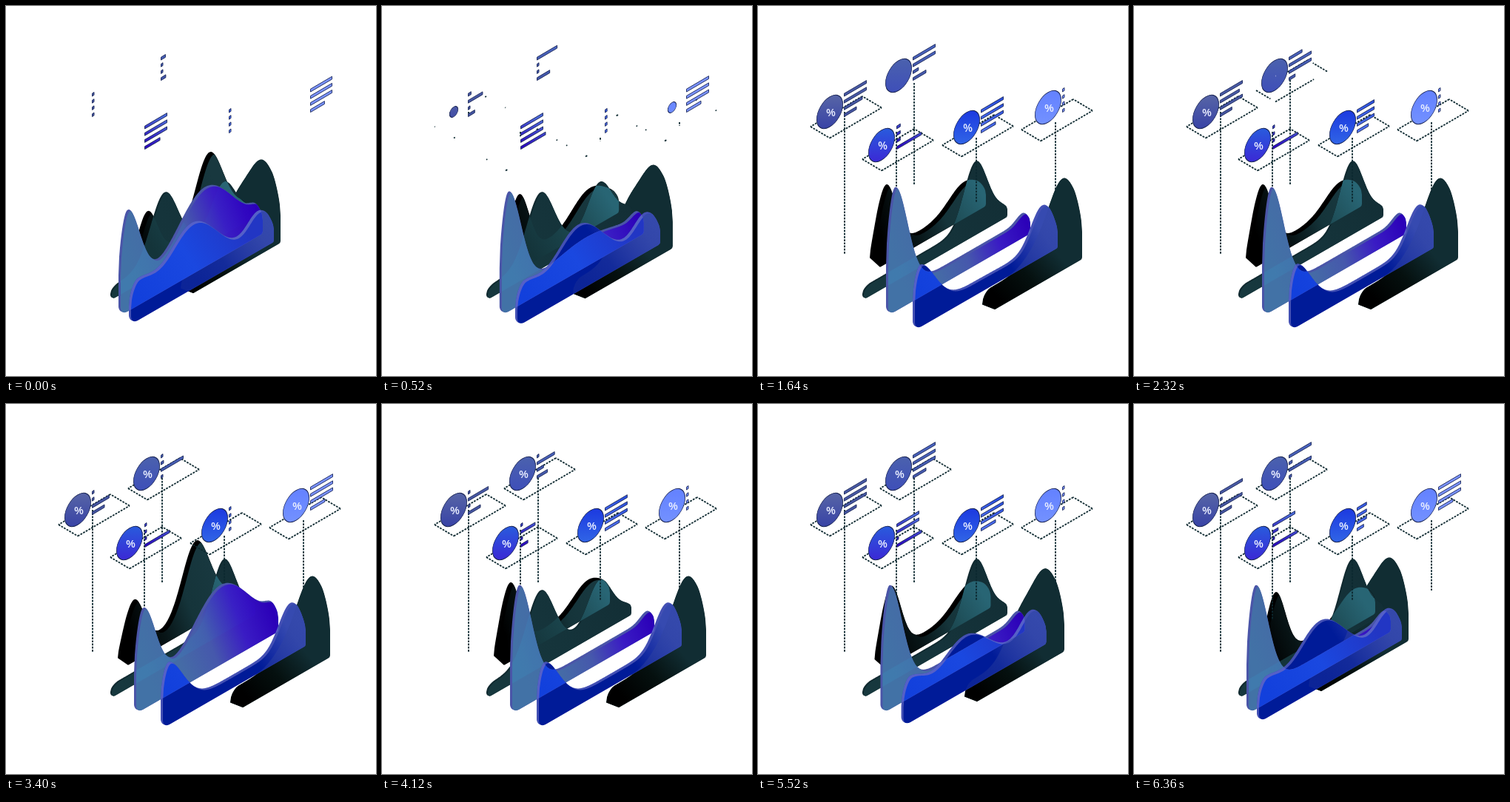
An HTML page with a canvas that plays this animation: 500 by 500 pixels, repeating every 6.4 s.

```html
<!DOCTYPE html>
<html lang="en">
<head>
<meta charset="utf-8">
<title>Isometric area charts</title>
<style>
  html, body { margin: 0; width: 100%; height: 100%; overflow: hidden; background: #fff; }
  canvas { display: block; width: 500px; height: 500px; }
</style>
</head>
<body>
<canvas id="stage" width="500" height="500"></canvas>
<script>
const ctx = document.getElementById('stage').getContext('2d');
const LOOP = 6400, STEP = 40, SLOPE = 0.577;
const INK = '#0d2930';

const clamp = v => Math.max(0, Math.min(1, v));
const mix = (a, b, p) => a + (b - a) * p;
const smooth = p => p * p * (3 - 2 * p);
const cubic = p => p < 0.5 ? 4 * p ** 3 : 1 - (2 - 2 * p) ** 3 / 2;
const grow = (t, start, dur) => cubic(clamp((t - start) / dur));

// 1 within `hold` of any peak time, easing to 0 over `fall`.
function pulse(t, peaks, hold, fall) {
  const away = Math.min(...peaks.map(c => Math.abs(t - c)));
  return 1 - smooth(clamp((away - hold) / fall));
}

// A ridge is a flat body plus bells: [centre, width, height at rest, height when morphed].
// `cut` slants the lower left end; `drift` is the shift when the stack closes.
const AREAS = {
  dark: {
    left: 303, right: 438, foot: 420, body: 33, cut: 17, drift: [-67, -22],
    bells: [[375, 24, 50, 12], [412, 28, 90, 90]],
    morph: t => pulse(t, [3240], 1500, 1100)
  },
  black: {
    left: 151, right: 308, foot: 361, body: 18, cut: 14, drift: [18, 13],
    bells: [[173, 19, 89, 66], [256, 26, 0, 94], [279, 30, 32, 6]],
    morph: t => pulse(t, [0, 3400], 0, 720)
  },
  teal: {
    left: 141, right: 337, foot: 398, body: 18, cut: 0, drift: [0, 0],
    bells: [[214, 26, 0, 86], [294, 22, 82, 54]],
    morph: t => pulse(t, [450, 4450], 500, 550)
  },
  mid: {
    left: 173, right: 368, foot: 420, body: 24, cut: 0, drift: [-21, 0],
    bells: [[185, 24, 144, 112], [290, 52, 0, 84], [357, 12, 10, 8]],
    morph: t => pulse(t, [0, 3400], 0, 720)
  },
  front: {
    left: 209, right: 405, foot: 440, body: 18, cut: 0, drift: [-43, -8],
    bells: [[217, 30, 34, 68], [294, 46, 72, 0], [384, 22, 35, 52]],
    morph: t => pulse(t, [3240], 1500, 1100)
  }
};

function areaPath(area, t, closed) {
  const { left, right, foot, body, cut, bells } = area;
  const [dx, dy] = area.drift.map(v => v * closed);
  const p = area.morph(t);
  const base = x => foot - (x - left) * SLOPE;
  const height = x => {
    const h = bells.reduce((sum, [c, w, a, b]) =>
      sum + mix(a, b, p) * Math.exp(-(((x - c) / w) ** 2)), body);
    const edge = clamp(Math.min(x - left, right - x) / 12);
    return h * (0.5 + 0.5 * Math.sqrt(1 - (1 - edge) ** 2));
  };
  const path = new Path2D();
  for (let x = left; x <= right; x++) path.lineTo(x + dx, base(x) - height(x) + dy);
  const x0 = left + cut, y0 = base(x0) + dy;
  path.arcTo(right + dx, base(right) + dy, x0 + dx, y0, 5);
  path.arcTo(x0 + dx, y0, left + dx, base(left) - height(left) + dy,
    cut ? 1 : Math.min(8, height(left) / 2));
  path.closePath();
  return path;
}

function shade(x0, y0, x1, y1, ...colors) {
  const g = ctx.createLinearGradient(x0, y0, x1, y1);
  colors.forEach((c, i) => g.addColorStop(i / Math.max(1, colors.length - 1), c));
  return g;
}

// Fills the face of a slab, leaving its rim along the upper left.
function slab(path, rim, face, dx, dy) {
  ctx.fillStyle = rim;
  ctx.fill(path);
  overlap(path, path, face, dx, dy);
}
function overlap(a, b, fill, dx = 0, dy = 0) {
  ctx.save();
  ctx.clip(a);
  ctx.clip(b);
  ctx.translate(dx, dy);
  ctx.fillStyle = fill;
  ctx.fill(b);
  ctx.restore();
}

// Labels: corner of the base, disc centre, bars origin, stem (x, from, to),
// start times, and for each bar the times at which it is longest.
const LABELS = [
  { base: [71, 163], disc: [97, 143], bars: [116, 120], stem: [117, 143, 335],
    fill: ['#5563a6', '#3a45a6'], bar: ['#4a5ba6', '#4353a0'],
    at: { base: 300, disc: 260, sign: 640, stem: 300 },
    peaks: [[1900, 5900], [1500, 4900], [2500, 5700], [1600, 3600, 5600]],
    hold: 600, fall: 900, last: 17 },
  { base: [165, 114], disc: [190, 94], bars: [209, 71], stem: [211, 241, 97],
    fill: ['#4a60ae', '#3f50b8'], bar: ['#4a64c0', '#4356a8'],
    at: { base: 1600, disc: 750, sign: 2160, stem: 700 },
    peaks: [[1300, 5800], [2000, 5000], [2900, 5800], [1200, 5000]],
    hold: 600, fall: 900, last: 18 },
  { base: [141, 207], disc: [167, 188], bars: [187, 164], stem: [187, 170, 292],
    fill: ['#2a58dc', '#3a2cd6'], bar: ['#4a68d8', '#2a00c0'],
    at: { base: 240, disc: 600, sign: 1200, stem: 240 },
    peaks: [[300, 5900], [300, 5100], [300], [1000, 2900, 5700]],
    hold: 600, fall: 900, last: 34 },
  { base: [249, 188], disc: [282, 164], bars: [301, 142], stem: [295, 178, 265],
    fill: ['#1d3ce0', '#2f62e6'], bar: ['#2a50e0', '#5474f0'],
    at: { base: 240, disc: 580, sign: 1200, stem: 240 },
    peaks: Array(4).fill([1640, 4600, 5500]),
    hold: 450, fall: 700, last: 20 },
  { base: [356, 167], disc: [392, 137], bars: [411, 114], stem: [402, 157, 253],
    fill: ['#6482ff', '#7290ff'], bar: ['#7a92ff', '#7a92ff'],
    at: { base: 240, disc: 260, sign: 680, stem: 240 },
    peaks: Array(4).fill([400, 3300, 6400]),
    hold: 350, fall: 450, last: 20 }
];

function dotted(x0, y0, x1, y1, p) {
  if (p <= 0) return;
  ctx.beginPath();
  ctx.moveTo(x0, y0);
  ctx.lineTo(mix(x0, x1, p), mix(y0, y1, p));
  ctx.stroke();
}

function drawDots(label, t) {
  ctx.save();
  ctx.strokeStyle = INK;
  ctx.lineWidth = 1.8;
  ctx.setLineDash([2.7, 1.5]);
  const [x, y] = label.base;
  const ring = [[x, y], [x + 26, y + 15.5], [x + 96, y - 25.5], [x + 70, y - 41]];
  const p = grow(t, label.at.base, 1200);
  ring.forEach((a, i) => dotted(...a, ...ring[(i + 1) % 4], p));
  const [sx, from, to] = label.stem;
  dotted(sx, from, sx, to, grow(t, label.at.stem, 1200));
  ctx.restore();
}

function drawDisc(label, t) {
  const r = 20.3 * grow(t, label.at.disc, 600);
  if (r < 0.3) return;
  ctx.save();
  ctx.translate(...label.disc);
  ctx.save();
  ctx.transform(0.866, -0.5, 0, 1, 0, 0);
  ctx.beginPath();
  ctx.arc(0, 0, r, 0, 7);
  ctx.fillStyle = shade(8, -16, -8, 16, ...label.fill);
  ctx.fill();
  ctx.strokeStyle = '#15204f';
  ctx.lineWidth = 0.9;
  ctx.stroke();
  ctx.restore();
  const s = grow(t, label.at.sign, 500);
  if (s > 0.02) {
    ctx.translate(1.5, 0.5);
    ctx.rotate((s - 1) * 2.6);
    ctx.scale(s, s);
    ctx.fillStyle = '#e8edff';
    ctx.font = '600 15px "Open Sans", Arial, sans-serif';
    ctx.textAlign = 'center';
    ctx.fillText('%', 0, 5.4);
  }
  ctx.restore();
}

function drawBars(label, t) {
  const [x, top] = label.bars;
  ctx.fillStyle = shade(x + 20, top - 15, x, top + 28, ...label.bar);
  ctx.strokeStyle = '#1a2758';
  ctx.lineWidth = 0.9;
  label.peaks.forEach((peaks, i) => {
    const l = mix(3, i < 3 ? 30.5 : label.last, pulse(t, peaks, label.hold, label.fall));
    const y = top + i * 9.2, rise = l * SLOPE;
    ctx.beginPath();
    ctx.moveTo(x + 0.5, y - 1.8);
    ctx.lineTo(x + l, y - 1.8 - rise);
    ctx.lineTo(x + l, y + 2 - rise);
    ctx.lineTo(x + 0.5, y + 2);
    ctx.closePath();
    ctx.fill();
    ctx.stroke();
  });
}

function drawCharts(t) {
  const closed = 1 - grow(t, 0, 1200) + grow(t, 4920, 1340);
  const shape = {};
  for (const name in AREAS) shape[name] = areaPath(AREAS[name], t, closed);
  const { dark, black, teal, mid, front } = shape;
  const shift = name => AREAS[name].drift[0] * closed;

  const k = shift('dark');
  slab(dark, '#0d2428', shade(325 + k, 395, 400 + k, 330, '#000', '#05100f', '#112d33'), 0, 0);
  slab(black, '#000', shade(165, 320, 290, 270, '#000', '#081517', '#15343a', '#18383f'), 6, 3);
  slab(teal, '#10292f', shade(145, 380, 330, 270, '#17383e', '#15343b', '#132f36'), 2, 1);
  overlap(black, teal, shade(200, 330, 306, 260, '#14343a', '#1b464e', '#286574'));

  LABELS.forEach(label => drawDots(label, t));

  const m = shift('mid');
  slab(mid, '#4a55a8',
    shade(180 + m, 340, 356 + m, 275, '#4272a6', '#456ba6', '#4658ac', '#3a1cc4', '#2b00b8'), 3, 2);
  overlap(teal, mid, shade(180 + m, 330, 340 + m, 275,
    'rgba(62,130,180,.5)', 'rgba(62,110,180,.35)', 'rgba(50,0,210,.2)'), 3, 2);

  const f = shift('front');
  slab(front, '#4350b4',
    shade(335 + f, 345, 385 + f, 310, '#001b98', '#1c32a6', '#364ab0'), 3, 2);
  overlap(dark, front, shade(300 + f, 370, 390 + f, 290,
    'rgba(30,50,150,.4)', 'rgba(52,72,170,.75)'), 3, 2);
  overlap(mid, front, '#5560c8');
  overlap(mid, front, shade(225 + f, 400, 370 + f, 310, '#1240dc', '#1a48e0', '#2236c4'), 3, 2.5);
}

function draw(t) {
  ctx.fillStyle = '#fff';
  ctx.fillRect(0, 0, 500, 500);
  drawCharts(t);
  LABELS.forEach(label => {
    drawDisc(label, t);
    drawBars(label, t);
  });
}

const begin = performance.now();
function tick() {
  const t = Math.max(0, performance.now() - begin) % LOOP;
  draw(Math.floor(t / STEP) * STEP);
  requestAnimationFrame(tick);
}
tick();
</script>
</body>
</html>
```
